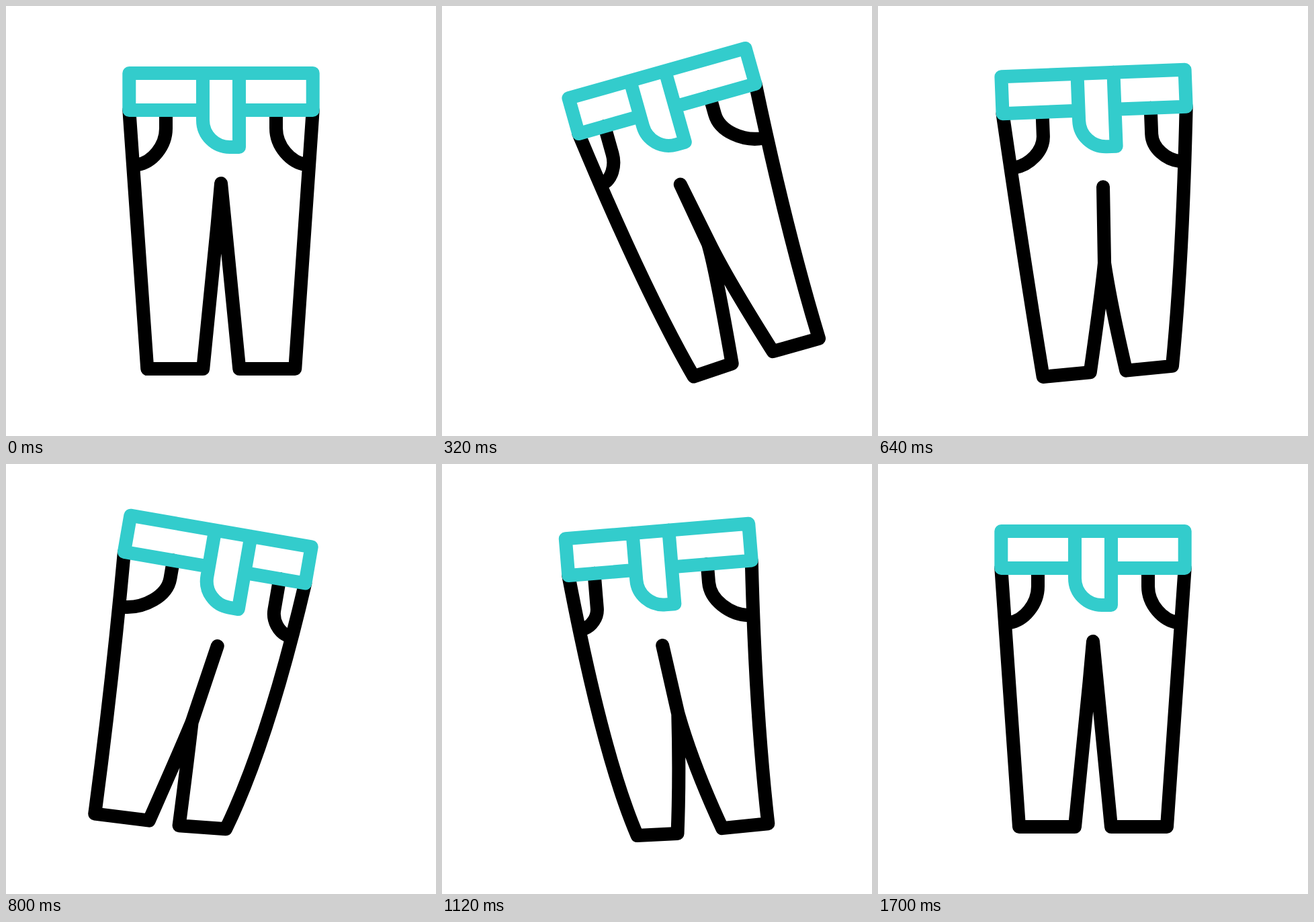
An HTML page that plays this animation: 640x640 px, repeating every 2400 ms.

```html
<!DOCTYPE html>
<html lang="en">
<head>
<meta charset="utf-8">
<title>Swinging trousers</title>
<style>
  html, body { margin: 0; width: 100%; height: 100%; overflow: hidden; background: #fff; }
  svg { display: block; width: 100%; height: 100%; }
  path { fill: none; stroke-width: 20; stroke-linecap: round; stroke-linejoin: round; }
  .cloth { stroke: #000; }
  .belt { stroke: #33cccc; }
</style>
</head>
<body>
<svg viewBox="0 0 640 640">
  <g id="swing">
    <path class="cloth" id="pockets"/>
    <path class="cloth" id="legs"/>
    <path class="belt" id="belt"/>
  </g>
</svg>
<script>
const LOOP = 2400, STEP = 20;

// Leg points are relative to the belt, which turns about its top centre.
// Pockets: [top x, end of the straight part, x at the seam]
const rest = {
  outL: [200, 396, 210, 540], inL: [293, 540, 307, 402, 314.5, 325],
  crotch: [320, 264],
  inR: [326, 325, 336, 430, 347, 540], outR: [430, 540, 441, 385],
  flap: [0], pocketL: [238, 182, 196], pocketR: [402, 182, 446]
};
const right = {
  outL: [218, 412, 261, 552], inL: [315, 548, 330, 402, 327, 376],
  crotch: [305.5, 270],
  inR: [327, 376, 338, 422, 381, 547], outR: [449, 547, 442, 374],
  flap: [-18.5], pocketL: [219.5, 202, 201], pocketR: [382, 182, 446]
};
const left = {
  outL: [199, 352, 206, 546.5], inL: [287.5, 542.5, 315.5, 431.5, 325.5, 388],
  crotch: [344.3, 269.3],
  inR: [325.7, 388, 329.5, 458.5, 332.5, 542.3], outR: [402, 535.4, 442.5, 397],
  flap: [18.5], pocketL: [258, 182, 196], pocketR: [418.5, 202, 443]
};
const rebound = {
  outL: [213, 428, 255.5, 549.5], inL: [314.5, 551.5, 324.5, 470, 329.5, 376],
  crotch: [314, 270.3],
  inR: [329.5, 376, 345.5, 454, 382, 549], outR: [450, 547.6, 444, 378],
  flap: [-10], pocketL: [221, 208, 200], pocketR: [390, 182, 446]
};

// [time, belt angle, pose]
const keys = [
  [-10, 0, rest], [460, -20, right], [780, 10, left],
  [1080, -5, rebound], [1400, 2, rest], [1700, 0, rest]
];

const el = id => document.getElementById(id);
const mix = (a, b, k) => a + (b - a) * k;
const ease = s => s * s * (3 - 2 * s);

function poseAt(t) {
  let i = 0;
  while (i < keys.length - 2 && t >= keys[i + 1][0]) i++;
  const [t0, a0, p0] = keys[i], [t1, a1, p1] = keys[i + 1];
  const k = ease(Math.min(1, (t - t0) / (t1 - t0)));
  const pose = { angle: mix(a0, a1, k) };
  for (const part in rest) pose[part] = p0[part].map((v, n) => mix(v, p1[part][n], k));
  return pose;
}

function pocket([x, y, seam]) {
  return `M${x} 155V${y}C${x} ${(y + 236) / 2} ${(x + seam) / 2} 233 ${seam} 236`;
}

function draw(t) {
  const p = poseAt(t);
  const l = 293 + p.flap[0], r = 347 + p.flap[0];
  el('swing').setAttribute('transform', `rotate(${p.angle} 320 100)`);
  el('pockets').setAttribute('d', pocket(p.pocketL) + pocket(p.pocketR));
  el('legs').setAttribute('d',
    `M183.3 155Q${p.outL}L${p.inL.slice(0, 2)}Q${p.inL.slice(2)}L${p.crotch}` +
    `L${p.inR.slice(0, 2)}Q${p.inR.slice(2)}L${p.outR.slice(0, 2)}Q${p.outR.slice(2)} 456.7 155`);
  el('belt').setAttribute('d',
    `M${l} 155H183.3V100H456.7V155H${r}` +
    `M${l} 100V170A40 40 0 0 0 ${l + 40} 210H${r}V100`);
}

const start = performance.now();
function tick() {
  const t = (performance.now() - start) % LOOP;
  draw(Math.floor(t / STEP) * STEP);
  requestAnimationFrame(tick);
}
tick();
</script>
</body>
</html>
```
